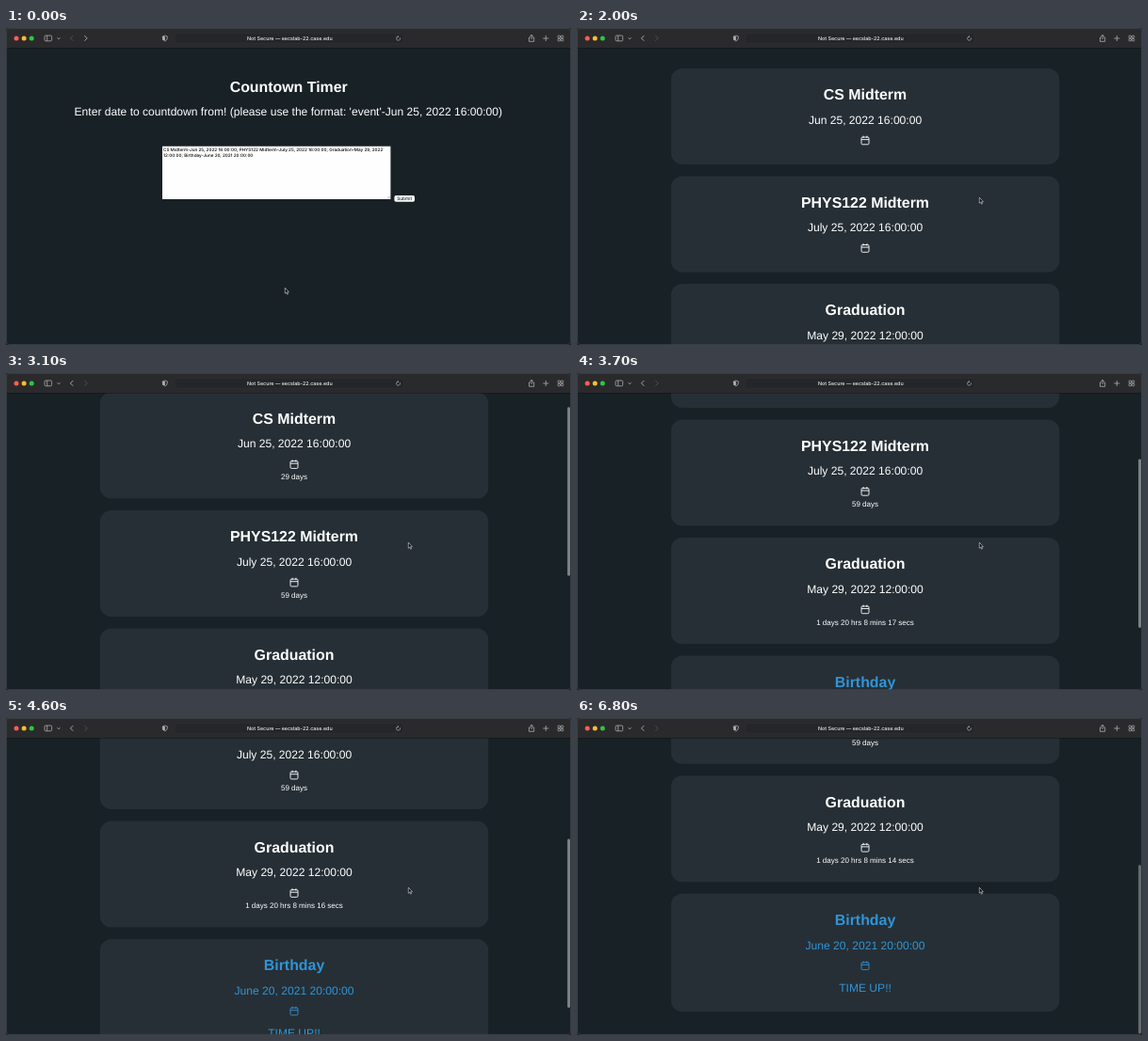
Animation of 600 by 337 pixels, one loop 6.9 s. Source, as an HTML page with a canvas:

```html
<!DOCTYPE html>
<html lang="en">
<head>
<meta charset="utf-8">
<title>Countdown Timer</title>
<style>
html, body { margin: 0; width: 100%; height: 100%; overflow: hidden; background: #182126; }
canvas { display: block; width: 600px; height: 337px; }
</style>
</head>
<body>
<canvas id="stage" width="600" height="337"></canvas>
<script>
const ctx = document.getElementById('stage').getContext('2d');
const W = 600, H = 337, BAR = 21, LOOP = 6900, STEP = 100;
const SANS = '"Liberation Sans", Arial, sans-serif';
const UI = 'Inter, Roboto, sans-serif';
const WHITE = '#fff', BLUE = '#3194d6', INK = '#b4b5b7', DIM = '#515356';
const LOADING = 1300, LOADED = 1400, FIRST_TICK = 2500;

const events = [
  { title: 'CS Midterm', date: 'Jun 25, 2022 16:00:00', left: () => '29 days' },
  { title: 'PHYS122 Midterm', date: 'July 25, 2022 16:00:00', left: () => '59 days' },
  { title: 'Graduation', date: 'May 29, 2022 12:00:00', left: n => `1 days 20 hrs 8 mins ${18 - n} secs` },
  { title: 'Birthday', date: 'June 20, 2021 20:00:00', over: true }
];

// Progress from 0 to 1 with a soft start and stop
function ease(t, from, to) {
  const u = Math.min(1, Math.max(0, (t - from) / (to - from)));
  return u * u * (3 - 2 * u);
}

function text(str, x, y, size, color, { weight = 400, font = SANS, align = 'center' } = {}) {
  ctx.font = `${weight} ${size}px ${font}`;
  ctx.textRendering = 'geometricPrecision';
  ctx.textAlign = align;
  ctx.fillStyle = color;
  ctx.fillText(str, x, y);
}

function box(x, y, w, h, r, color) {
  ctx.beginPath();
  ctx.roundRect(x, y, w, h, r);
  ctx.fillStyle = color;
  ctx.fill();
}

function frame(x, y, w, h, r, color, width = 0.75) {
  ctx.beginPath();
  ctx.roundRect(x, y, w, h, r);
  ctx.strokeStyle = color;
  ctx.lineWidth = width;
  ctx.stroke();
}

// Strokes, and optionally fills, an SVG path placed at x, y
function shape(d, x, y, color, { width = 0.75, fill } = {}) {
  const path = new Path2D(d);
  ctx.save();
  ctx.translate(x, y);
  if (fill) {
    ctx.fillStyle = fill;
    ctx.fill(path);
  }
  ctx.strokeStyle = color;
  ctx.lineWidth = width;
  ctx.stroke(path);
  ctx.restore();
}

function drawToolbar(canGoBack) {
  ctx.fillStyle = '#2a2a2d';
  ctx.fillRect(0, 0, W, BAR);
  ctx.fillStyle = '#0f1214';
  ctx.fillRect(0, BAR, W, 0.5);

  ['#fc5f57', '#fdbc30', '#2bc840'].forEach((c, i) => box(8.5 + i * 8.1, 8.5, 5, 5, 2.5, c));

  frame(41, 8, 7.6, 5.8, 1.2, INK);
  shape('M0 0v5.8', 43.7, 8, INK);
  shape('M-1.6 0L0 1.5L1.6 0', 56, 10.3, INK);
  shape('M2.8 -2.8L0 0L2.8 2.8', 68.4, 10.9, canGoBack ? INK : DIM, { width: 0.9 });
  shape('M-2.8 -2.8L0 0L-2.8 2.8', 86.2, 10.9, canGoBack ? DIM : INK, { width: 0.9 });

  shape('M0 -3L2.6 -2Q3 2 0 3Q-3 2 -2.6 -2Z', 168.8, 11, INK);
  box(166.4, 8.9, 2.4, 4, 0.5, INK);

  box(179, 5.6, 243, 10.8, 2.4, '#252629');
  frame(179, 5.6, 243, 10.8, 2.4, '#303134', 0.6);
  const label = { weight: 500, font: UI, align: 'left' };
  text('Not Secure — eecslab-22.case.edu', 256, 12.9, 5.35, '#f2f2f3', label);

  shape('M2 -0.8A2 2 0 1 1 0 -2M-0.6 -3L0.6 -2L-0.6 -1', 416.4, 11.2, INK, { width: 0.65 });
  shape('M-1.1 0H-2.6V4.3H2.6V0H1.1M0 2V-2.7M-1.6 -1L0 -2.7L1.6 -1', 558.1, 10, INK);
  shape('M-3 0H3M0 -3V3', 573.3, 11, INK);
  for (let i = 0; i < 4; i++)
    frame(586.1 + 3.3 * (i % 2), 8.1 + 3.3 * (i >> 1), 2.4, 2.4, 0.5, INK, 0.7);
}

function drawForm() {
  text('Countown Timer', 300.2, 68, 15.9, WHITE, { weight: 700 });
  text("Enter date to countdown from! (please use the format: 'event'-Jun 25, 2022 16:00:00)",
    299.8, 93.4, 12.08, WHITE);

  box(166, 125.8, 242.4, 56.2, 0, '#fefefe');
  const field = { weight: 500, font: UI, align: 'left' };
  text('CS Midterm-Jun 25, 2022 16:00:00; PHYS122 Midterm-July 25, 2022 16:00:00; Graduation-May 29, 2022',
    167, 131.4, 4.63, '#000', field);
  text('12:00:00; Birthday-June 20, 2021 20:00:00', 167, 136.9, 4.63, '#000', field);
  shape('M-2.5 0L0 -2.5M-1 0L0 -1', 407.6, 181.3, '#777', { width: 0.5 });

  box(412.4, 178, 21.6, 6.8, 1.8, '#f6f7f7');
  text('Submit', 423.1, 183.2, 4.8, '#000', { font: UI });
}

function drawCalendar(x, y, color) {
  frame(x - 4, y + 1.4, 8, 7.8, 1.2, color, 0.9);
  shape('M-4 4H4M-1.9 0V2.4M1.9 0V2.4', x, y, color, { width: 0.9 });
}

function drawCards(t) {
  const ticks = Math.floor((t - FIRST_TICK) / 1000);
  const counting = ticks >= 0;
  const scroll = 165.7 * ease(t, 2770, 4200) + 67 * ease(t, 4200, 5350);
  const mid = 306;
  let top = 43 - scroll;
  for (const e of events) {
    const color = e.over ? BLUE : WHITE;
    const h = !counting ? 102 : e.over ? 125.5 : 113;
    box(mid - 206.2, top, 412.5, h, 12, '#262f35');
    text(e.title, mid, top + 33.3, 15.9, color, { weight: 700 });
    text(e.date, mid, top + 58.7, 12.08, color);
    drawCalendar(mid, top + 71.6, color);
    if (counting) {
      if (e.over) text('TIME UP!!', mid, top + 104, 12.08, color);
      else text(e.left(ticks), mid, top + 92.7, 8, color);
    }
    top += h + 12.5;
  }
  if (counting) {
    const fade = 1 - 0.25 * ease(t, 6400, 6900);
    box(596.2, 23.5 + scroll * 0.57, 2.8, 179.5, 1.4, `rgba(128,134,138,${fade})`);
  }
}

function drawCursor(t) {
  const k = ease(t, 0, 800);
  shape('M0 0V6L1.4 4.8L2.3 7L3.2 6.6L2.3 4.5H4.1Z', 296.3 + 131 * k, 276.2 - 96 * k, '#dfe2e3',
    { width: 0.6, fill: '#060606' });
}

function draw(t) {
  ctx.fillStyle = '#182126';
  ctx.fillRect(0, 0, W, H);
  if (t < LOADED) drawForm();
  else drawCards(t);
  drawToolbar(t >= LOADING);
  frame(0.5, 0.5, W - 1, H - 1, 3, '#3d4346', 0.8);
  drawCursor(t);
}

const start = performance.now();
function tick() {
  const t = (performance.now() - start) % LOOP;
  draw(Math.floor(t / STEP) * STEP);
  requestAnimationFrame(tick);
}
tick();
</script>
</body>
</html>
```
